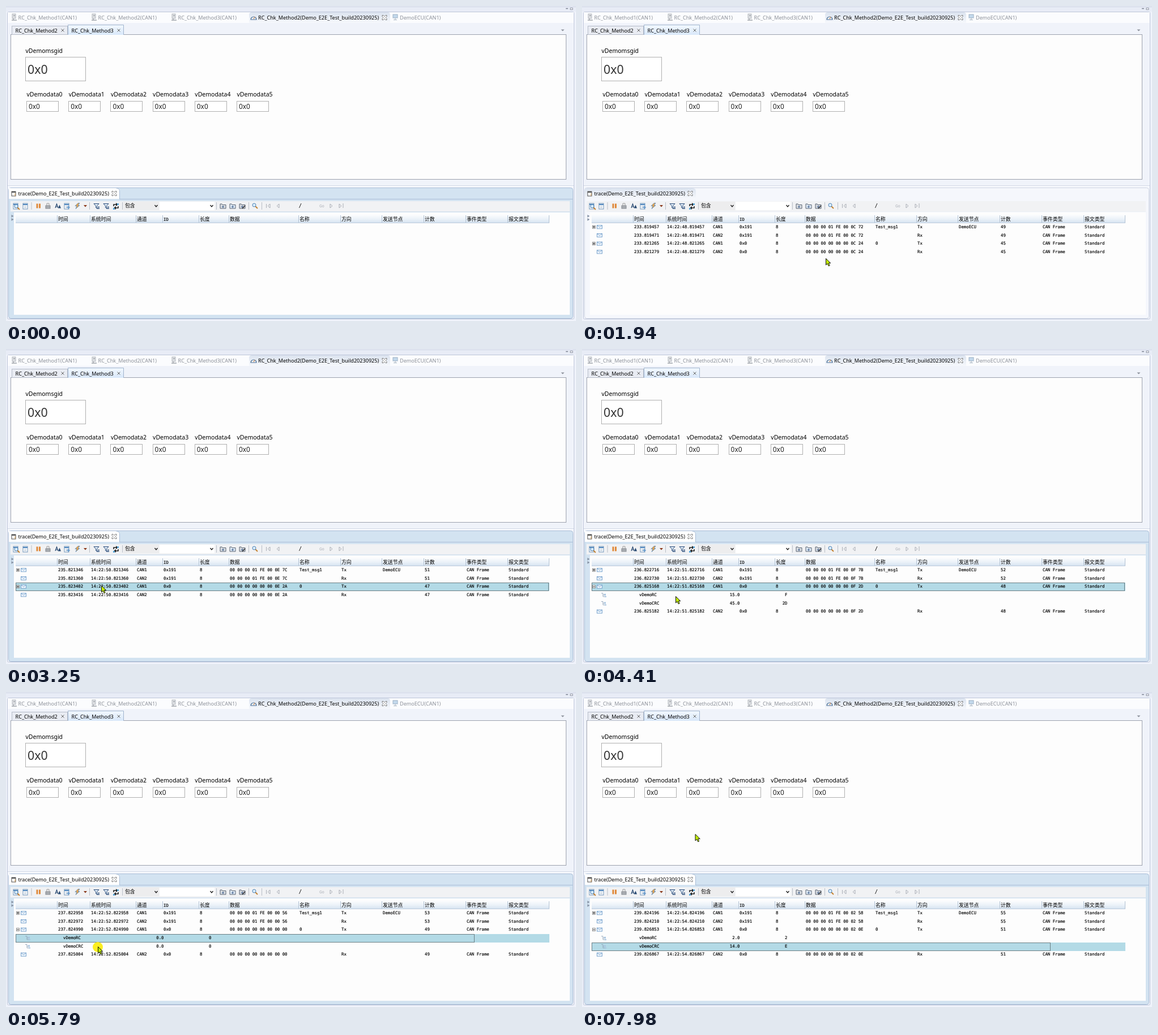
Write an HTML page that moves like this. It is 1006 px wide and 557 px high and loops after 8 s.

```html
<!DOCTYPE html>
<html lang="zh">
<head>
<meta charset="utf-8">
<title>CAN trace</title>
<style>
html, body { margin: 0; width: 100%; height: 100%; overflow: hidden; background: #eff2fa; }
svg { display: block; width: 1006px; height: 557px; }
text { font: 9.1px "Noto Sans", "Noto Sans CJK SC", sans-serif; fill: #000; }
.dim { fill: #8d9199; }
.label { font-size: 10.5px; }
.value { font-size: 11.9px; fill: #222; }
.big { font-size: 21.3px; fill: #333; }
.mono { font: 7.33px "DejaVu Sans Mono", "Noto Sans CJK SC", monospace; fill: #000; stroke: #000; stroke-width: .15; }
.head { font: 8.9px "Noto Sans CJK SC", "Noto Sans CJK", sans-serif; fill: #000; }
.end { text-anchor: end; }
</style>
</head>
<body>
<svg viewBox="0 0 1006 557">
  <defs>
    <linearGradient id="headFill" x2="0" y2="1"><stop stop-color="#fcfdfe"/><stop offset=".55" stop-color="#eaf1f8"/><stop offset="1" stop-color="#d3e1f0"/></linearGradient>
    <linearGradient id="tabFill" x2="0" y2="1"><stop stop-color="#dbe3ef"/><stop offset="1" stop-color="#f6f8fc"/></linearGradient>
    <linearGradient id="subFill" x2="0" y2="1"><stop stop-color="#f2f8ff"/><stop offset="1" stop-color="#d9e8fa"/></linearGradient>
  </defs>
  <g id="upper"></g>
  <g id="frame"></g>
  <g id="tools"></g>
  <g id="rows"></g>
  <g id="tip"></g>
  <g id="pointer"></g>
</svg>
<script>
const LOOP = 8000;
const COLS = [92, 150, 231, 278, 342, 395, 518, 592, 665, 739, 813, 887];
const HEADS = ['时间', '系统时间', '通道', 'ID', '长度', '数据', '名称', '方向', '发送节点', '计数', '事件类型', '报文类型'];
const ROW_H = 14.68;

// start time, second, microseconds of message 0x191 and of message 0x0
const UPDATES = [
  [1250, 233, 819457, 821265],
  [2193, 234, 820123, 821790],
  [3250, 235, 821346, 823402],
  [4210, 236, 822716, 825168],
  [5790, 237, 822958, 824990],
  [6225, 238, 824934, 826534],
  [7720, 239, 824196, 826853]
];

// start, end, number of positions, from x, y, to x, y
const MOVES = [
  [1150, 1940, 10, 977, 549, 430, 446],
  [2010, 2650, 8, 380, 447, 138, 428],
  [2940, 2940, 1, 168, 418],
  [4410, 4410, 1, 165, 437],
  [4910, 4910, 1, 163, 446],
  [5220, 5220, 1, 162, 450],
  [6225, 6310, 2, 178, 445, 194, 439],
  [6950, 6950, 1, 196, 437],
  [7720, 7980, 5, 197, 412, 199.5, 251]
];

const $ = id => document.getElementById(id);
const text = (x, y, s, cls = '') => `<text x="${x}" y="${y}" class="${cls}">${s}</text>`;
const rect = (x, y, w, h, fill, stroke = 'none', more = '') =>
  `<rect x="${x}" y="${y}" width="${w}" height="${h}" fill="${fill}" stroke="${stroke}" ${more}/>`;
const path = (d, stroke, fill = 'none', w = 1) =>
  `<path d="${d}" stroke="${stroke}" fill="${fill}" stroke-width="${w}"/>`;
const at = (x, y, s) => `<g transform="translate(${x} ${y})">${s}</g>`;

const cross = (x, y, color) => at(x, y, path('M-2.5-2.5l5 5m0-5l-5 5', color));
const closeBox = (x, y) => at(x, y,
  path('M-4-4h2l2 2 2-2h2v2l-2 2 2 2v2h-2l-2-2-2 2h-2v-2l2-2-2-2z', '#555', '#fff', .8));

function nodeIcon(x) {
  return at(x, 20, rect(-3, -6, 6, 8, '#dfe1e4', '#a9adb3', 'stroke-width=".8"') +
    path('M-4 5h9M-1 2v3M-1-3h3', '#a0a4aa', 'none', 1.4));
}

function drawUpper() {
  let s = rect(0, 0, 1006, 557, '#eff2fa') + rect(0, 0, 1006, 10, '#e8ecf6') +
    rect(2.5, 10.5, 1000, 543, '#f5f7fc', '#bcc4d8', 'rx="2"') +
    path('M0 1.5H1006', '#cfd5e4') +
    rect(3, 11, 999, 19, '#fbfcfe') +
    path('M429 30V16q0-5 5-5H673q5 0 5 5V30z', 'none', 'url(#tabFill)') +
    rect(4, 30, 997, 286, '#f0f3fa') +
    path('M3 317.5H1002', '#d2d8e6');
  [1, 2, 3].forEach((n, i) => {
    s += nodeIcon(14 + 141 * i) + text(21.5 + 141 * i, 24, `RC_Chk_Method${n}(CAN1)`, 'dim');
  });
  s += at(437, 21, path('M-5 3a5 5 0 1 1 10 0z', '#4b6f96', '#e8eef6', 1.2) + path('M0 2l2-4', '#d07a30')) +
    text(445, 24, 'RC_Chk_Method2(Demo_E2E_Test_build20230925)') + closeBox(668, 20.5) +
    at(687, 20, rect(-4, -5, 8, 6, '#c3d9ec', '#9db0c4') + path('M-3 4.5h6M0 1v3', '#a8b4c0')) +
    text(695, 24, 'DemoECU(CAN1)', 'dim') +
    path('M988 4.5h4', '#7d8494', 'none', 1.5) + rect(996, 3.5, 4, 3, '#fff', '#8b92a2') +
    rect(8.5, 50.5, 980, 256, '#fdfdfd', '#9da2ae') +
    rect(10.5, 35.5, 98, 15, '#e9ecf3', '#b7bdca') +
    path('M109.5 51V33.5H207.5V51', '#9fb3cd', 'url(#subFill)') +
    text(16.5, 46.5, 'RC_Chk_Method2') + cross(100, 43, '#666') +
    text(115.5, 46.5, 'RC_Chk_Method3') + cross(199, 43, '#666') +
    path('M979.5 41.5h6l-3 3z', 'none', '#8a8f99') +
    text(34.5, 82.5, 'vDemomsgid', 'label') +
    rect(34.5, 90.5, 106, 42, '#fff', '#b0b0b0') + text(38, 120, '0x0', 'big');
  for (let i = 0; i < 6; i++) {
    const x = 36.5 + 74.2 * i;
    s += text(x, 160, 'vDemodata' + i, 'label') +
      rect(Math.floor(x) + .5, 168.5, 56, 18, '#fff', '#b0b0b0') + text(x + 3.5, 182, '0x0', 'value');
  }
  $('upper').innerHTML = s;
}

function drawFrame(active) {
  const tint = active ? '#d3e3f1' : '#f5f7fc';
  const edge = active ? '#a9bdd7' : '#cdd4e3';
  $('frame').innerHTML =
    rect(4.5, 321.5, 996, 231, tint, edge, 'rx="4"') +
    path('M5 341V322H195q6 0 6 6V341z', 'none', active ? '#fff' : 'url(#tabFill)') +
    (active ? path('M200.5 341V328q0-6-6-6M200 341.5H1000', edge) : '') +
    rect(8, 345, 987, 18, '#f1f2f4') +
    rect(14, 365, 981, 181, '#fdfdfd') +
    path('M8 363.5H995', active ? '#dce4ee' : '#eceff4');
}

const sheet = x => at(x, 354, rect(-4, -5, 8, 10, '#fff', '#6f93b8') + path('M-4-3h8', '#4f86bd', 'none', 2) +
  path('M-2 0h4M-2 2.5h4', '#a7b9cb'));
const funnel = x => at(x, 354, path('M-5-4.5h9l-3.5 4v4l-2-1v-3z', '#2d4f7c', '#dce8f4') +
  path('M0 4h5M2 1.5h3', '#2d4f7c', 'none', 1.4));
const folder = (x, fill) => at(x, 354, path('M-5 4V-4h3l1 1.5h6V4z', '#5a6472', fill) + path('M0-1v4M-2 1h4', '#3c5d8a'));
const glass = (x, y) => at(x, y, path('M1 1l4 4', '#c48332', 'none', 2) + `<circle cx="-1" cy="-1" r="3" fill="#dcefff" stroke="#4b80b2"/>`);
const chevron = x => path(`M${x - 2.5} 352l2.5 3 2.5-3`, '#222', 'none', 1.4);

function drawTools() {
  let s = at(14, 332, rect(-4, -4, 7, 8, '#fff', '#4d4d4d') + path('M-4-3h7', '#555', 'none', 2) + path('M2-1v5', '#d69b4c')) +
    text(21.5, 335, 'trace(Demo_E2E_Test_build20230925)') + closeBox(191, 331.5) +
    sheet(17) + glass(19, 355) + sheet(34) +
    path('M55 349.5v8M59.5 349.5v8', '#e08a3c', 'none', 3) +
    at(74, 354, rect(-4, -1, 8, 5, '#a9adb2', '#85898f') + path('M-2-1v-4h4v4', '#999')) +
    path('M87 357l2.5-7 2.5 7M88 355h3', '#24466f', 'none', 1.2) + path('M92 357.5h5l-2.5-6z', 'none', '#24466f') +
    sheet(107) + at(110, 356, path('M-3 0h6M0-3v6', '#3a7ec0')) +
    path('M127 348.5h3l-3 4h3l-7 6 2-5h-3z', '#4f87bd', '#f0a445', .8) +
    path('M137 352h6l-3 3.5z', 'none', '#8a3a1c') +
    funnel(160) + funnel(177) +
    at(194, 354, path('M-4 0v-3h5M4 0v3h-5', '#222', 'none', 1.6) + path('M0-6l4 3-4 3zM0 0l-4 3 4 3z', 'none', '#222') +
      rect(2, -5, 3, 3, '#58a6d8') + rect(-5, 3, 3, 3, '#58a6d8')) +
    rect(207, 346, 63, 15, '#ededee') + text(210, 356, '包含', 'head') + chevron(265) +
    rect(271, 346, 97, 15, '#fff') + chevron(363) +
    folder(383, '#d9dde2') + folder(400, '#dce8f5') + folder(417, '#d4d8de') +
    path('M417 358l5-5', '#333', 'none', 1.6) + glass(439, 353) +
    path('M459.5 350v7M466 350l-4 3.5 4 3.5zM482 350l-4 3.5 4 3.5z', '#a9adb5') +
    path('M517.5 357l3.5-8', '#222') + `<text x="553" y="356" style="font-size:6.5px;fill:#a9adb5">Go</text>` +
    path('M572 350l4 3.5-4 3.5zM588 350l4 3.5-4 3.5zM595 349v8', '#a9adb5');
  [45, 147.5, 205.5, 371.5, 428.5, 451.5].forEach(x => s += path(`M${x} 347v13`, '#b9bec7'));
  s += path('M9.5 369l4 2.5-4 2.5zM9.5 375l4 2.5-4 2.5z', 'none', '#8793a5') +
    rect(17, 369, 942, 15, 'url(#headFill)') + path('M17 383.5H959', '#bccbdc');
  COLS.forEach((x, i) => {
    s += path(`M${Math.floor(x) - 1.5} 370v13`, '#b3c2d3') + text(x, 379.5, HEADS[i], i === 3 ? 'mono' : 'head');
  });
  $('tools').innerHTML = s + path('M958.5 370v13', '#b3c2d3');
}

const hex = (n, len = 2) => n.toString(16).toUpperCase().padStart(len, '0');
// CRC-8 with polynomial 0x07, valid for a 4-bit counter
const crc = n => n ^ n << 1 ^ n << 2;

const envelope = y => at(31, y, rect(-4.5, -3, 9, 6, '#eef5fc', '#6f9cc9', 'stroke-width=".9"') +
  path('M-4.5-3l4.5 3.5 4.5-3.5', '#6f9cc9', 'none', .8));
const expander = (y, open) => at(21, y, rect(-2.5, -2.5, 5, 5, '#fff', '#777', 'stroke-width=".8"') +
  path(open ? 'M-1.7 0h3.4' : 'M-1.7 0h3.4M0-1.7v3.4', '#000', 'none', .9));
const center = i => 390.8 + ROW_H * i;

function frameRow(i, [sec, micro], cells) {
  const y = center(i);
  const values = [`${sec}.${micro}`, `14:22:${sec - 185}.${micro}`, ...cells, 'CAN Frame', 'Standard'];
  return envelope(y) + values.map((v, k) => text(COLS[k], y + 2.2, v, 'mono')).join('');
}

function signalRow(i, name, n) {
  const y = center(i);
  return at(38, y, path('M-4-3h3v3h4M-1 0v3h4', '#8fa3b8', 'none', .9) + rect(1, -2, 3, 3, '#a9c5e0') + rect(2, 2, 3, 2, '#a9c5e0')) +
    text(101, y + 2.2, name, 'mono') + text(278.5, y + 2.2, n.toFixed(1), 'mono end') +
    text(362.5, y + 2.2, hex(n, 1), 'mono end');
}

function drawRows(update, open, selected) {
  if (!update) return '';
  const [, sec, a, b] = update;
  const count = sec - 184, n = (sec - 221) % 16;
  const first = '00 00 00 01 FE 00 ' + hex(n) + ' ' + hex(0x56 ^ crc(n));
  const second = '00 00 00 00 00 00 ' + hex(n) + ' ' + hex(crc(n));
  let s = '';
  if (selected) {
    const y = Math.round(384 + ROW_H * selected), w = selected === 2 ? 940 : 809;
    s += rect(17, y, 942, 15, '#b3dae6') +
      rect(17.5, y + .5, w, 14, 'none', '#222', 'stroke-dasharray="1 1"');
  }
  s += expander(center(0), false) + expander(center(2), open) +
    frameRow(0, [sec, a], ['CAN1', '0x191', 8, first, 'Test_msg1', 'Tx', 'DemoECU', count]) +
    frameRow(1, [sec, a + 14], ['CAN2', '0x191', 8, first, '', 'Rx', '', count]) +
    frameRow(2, [sec, b], ['CAN1', '0x0', 8, second, '0', 'Tx', '', count - 4]);
  if (open) s += signalRow(3, 'vDemoRC', n) + signalRow(4, 'vDemoCRC', crc(n));
  return s + frameRow(open ? 5 : 3, [sec, b + 14], ['CAN2', '0x0', 8, second, '', 'Rx', '', count - 4]);
}

function drawTip() {
  const lines = ['Name : vDemoRC', 'RawValue : E', 'PhyValue : 14.0', 'Unit :', 'Comment :'];
  $('tip').innerHTML = rect(205, 446, 82, 68, '#000', 'none', 'opacity=".22"') +
    rect(203.5, 444.5, 81, 67, '#fff', '#6b6b6b') +
    lines.map((s, i) => text(206, 456 + 12.5 * i, s)).join('');
}

function drawPointer(t) {
  const move = MOVES.filter(m => t >= m[0]).pop();
  if (!move) return '';
  const [t0, t1, n, x0, y0, x1, y1] = move;
  const k = n > 1 ? Math.min(n - 1, Math.floor((t - t0) / (t1 - t0) * (n - 1) + 1e-6)) / (n - 1) : 0;
  const x = k ? x0 + (x1 - x0) * k : x0, y = k ? y0 + (y1 - y0) * k : y0;
  if (t < 1250) return at(977, 549, path('M0-7l4 4h-3v6h3l-4 4-4-4h3v-6h-3z', '#000', '#a9b800', 1.2));
  const ring = t >= 5790 && t < 6140 ? `<circle cx="${x}" cy="${y + 1}" r="9" fill="#fcee21"/>` : '';
  const fill = t >= 2940 && t < 3150 ? '#ccd66a' : '#c3ee00';
  return ring + at(x, y, path('M.5.5v11.5l2.7-2.5 2 4.3 2-.9-2-4.2h3.6z', '#111', fill));
}

const shown = {};
function put(id, key, draw) {
  if (shown[id] === key) return;
  shown[id] = key;
  draw();
}

function render(t) {
  const active = t < 1150 || t >= 3150;
  const update = UPDATES.filter(u => t >= u[0]).pop();
  const open = t >= 3810;
  const selected = t < 3150 ? 0 : t < 4680 ? 2 : t < 6140 ? 3 : 4;
  put('frame', active, () => drawFrame(active));
  put('rows', [update, open, selected].join(), () => $('rows').innerHTML = drawRows(update, open, selected));
  $('tip').setAttribute('visibility', t >= 6950 && t < 7720 ? 'visible' : 'hidden');
  const pointer = drawPointer(t);
  put('pointer', pointer, () => $('pointer').innerHTML = pointer);
}

drawUpper();
drawTools();
drawTip();
const start = performance.now();
function tick() {
  render((performance.now() - start) % LOOP);
  requestAnimationFrame(tick);
}
tick();
</script>
</body>
</html>
```
